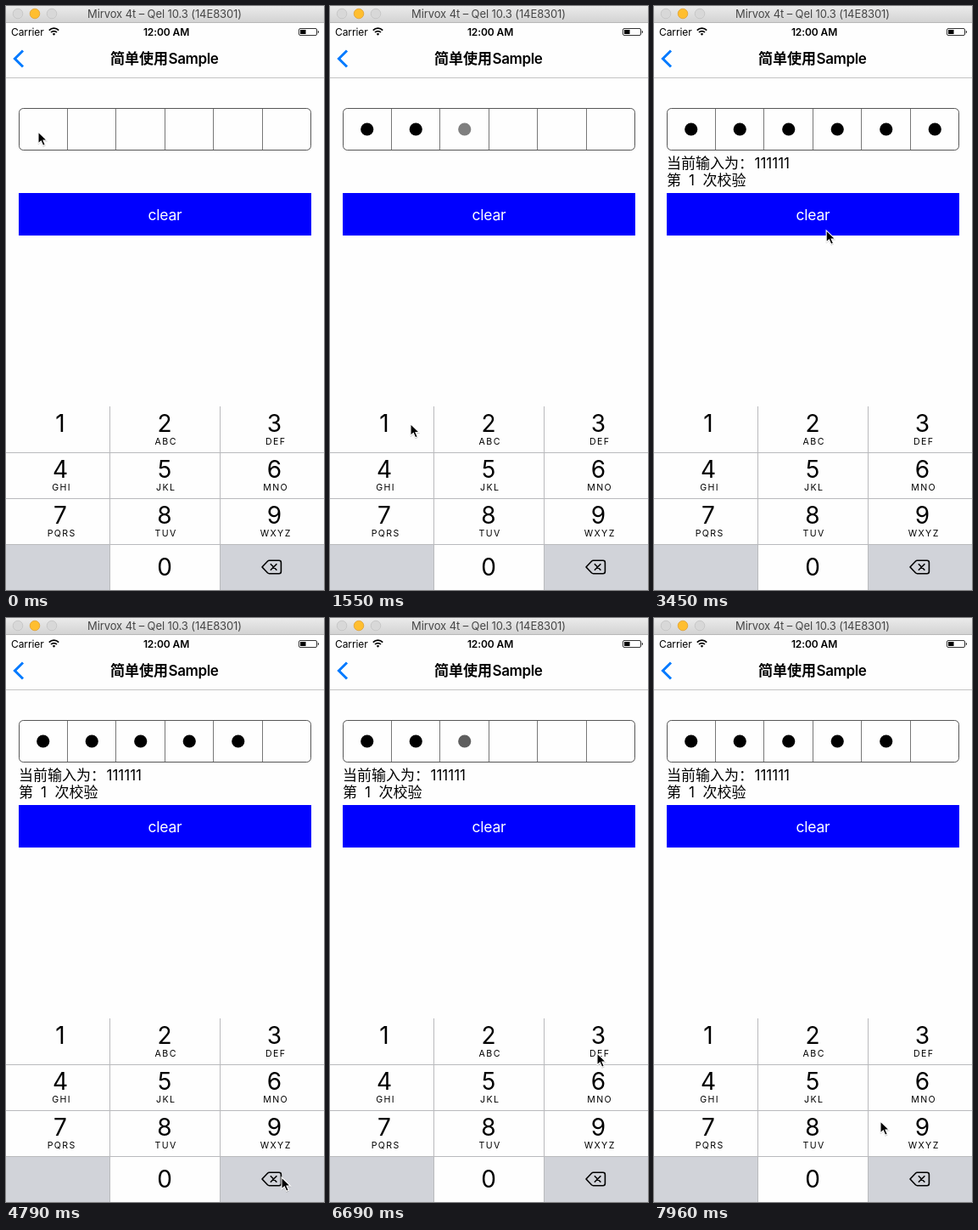
An HTML page for the animation above (8 s loop, 375x687 px).

```html
<!DOCTYPE html>
<html lang="zh-CN">
<head>
<meta charset="utf-8">
<title>Passcode input</title>
<style>
  html, body { margin: 0; width: 100%; height: 100%; overflow: hidden; background: #fefefe; }
  svg { display: block; width: 375px; height: 687px; }
  text { font-family: Inter, "Noto Sans CJK SC", "Noto Sans CJK", sans-serif; white-space: pre; }
  .mid { text-anchor: middle; }
  .window { font-size: 13px; fill: #464646; letter-spacing: -.1px; }
  .status { font-size: 12px; letter-spacing: -.1px; }
  .bold { font-weight: 600; }
  .title { font-size: 17px; font-weight: 600; letter-spacing: -.4px; }
  .han { font-family: "Noto Sans CJK SC", "Noto Sans CJK", sans-serif; font-size: 17px; }
  .body { font-size: 17px; }
  .clear { font-size: 17.5px; fill: #fff; letter-spacing: -.2px; }
  .digit { font-size: 28px; }
  .letters { font-size: 10.6px; letter-spacing: 1.4px; }
  .line { fill: none; stroke: #000; }
</style>
</head>
<body>
<svg viewBox="0 0 375 687">
  <defs>
    <linearGradient id="bar" x2="0" y2="1">
      <stop stop-color="#ebebeb"/><stop offset="1" stop-color="#d3d3d3"/>
    </linearGradient>
  </defs>
  <rect width="375" height="687" fill="#fefefe"/>

  <rect width="375" height="19" fill="url(#bar)"/>
  <rect y="19" width="375" height="1" fill="#b8b8b8"/>
  <g stroke-width=".8">
    <circle cx="14" cy="9" r="5.8" fill="#d8d8d8" stroke="#c3c3c3"/>
    <circle cx="34" cy="9" r="5.8" fill="#ffbe2f" stroke="#e0a032"/>
    <circle cx="54" cy="9" r="5.8" fill="#d8d8d8" stroke="#c3c3c3"/>
  </g>
  <text class="window mid" x="187" y="14">Mirvox 4t – Qel 10.3 (14E8301)</text>

  <text class="status" x="6" y="34.5">Carrier</text>
  <g class="line" stroke-width="1.7">
    <path d="M50.8 28.6a8 8 0 0 1 11.4 0M53 31a4.9 4.9 0 0 1 7 0"/>
    <path d="M56.5 34.8l-1.8-2a2.7 2.7 0 0 1 3.6 0z" fill="#000" stroke="none"/>
  </g>
  <text class="status bold mid" x="189" y="34.5">12:00 AM</text>
  <rect class="line" x="345.5" y="26.5" width="21" height="8" rx="1.5" stroke-width=".8"/>
  <rect x="347" y="28" width="6.5" height="5" fill="#000"/>
  <path d="M367.8 28.8a2 2 0 0 1 0 3.6z"/>

  <path d="M20 52.5L10.4 62L20 71.5" fill="none" stroke="#007aff" stroke-width="3"/>
  <text class="han bold" x="123" y="68">简单使用</text>
  <text class="title" x="191.5" y="68">Sample</text>
  <rect y="84" width="375" height="1" fill="#c4c4c4"/>

  <rect class="line" x="15.5" y="120.5" width="344" height="49" rx="5" stroke="#000" stroke-opacity=".66"/>
  <g id="cells"></g>
  <g id="result">
    <text class="han" x="15" y="191">当前输入为：</text>
    <text class="body" x="118.5" y="191">111111</text>
    <text class="han" x="15" y="211">第</text>
    <text class="body" x="41" y="211">1</text>
    <text class="han" x="57.5" y="211">次校验</text>
  </g>

  <rect x="15" y="220" width="345" height="50" fill="#00f"/>
  <text class="clear mid" x="187.5" y="251.5">clear</text>

  <g id="pad"></g>
  <g id="erase" class="line" stroke-width="1.6" stroke-linejoin="round" stroke-linecap="round">
    <path d="M302 660l6.4-6.8q.9-.9 2.1-.9H322q2.4 0 2.4 2.4v10.6q0 2.4-2.4 2.4h-11.5q-1.2 0-2.1-.9z"/>
    <path id="cross" d="M312.3 656.7l6.6 6.6m0-6.6l-6.6 6.6"/>
  </g>

  <g id="cursor">
    <path d="M0 1V15L3.3 12L5.7 17.3L8.3 16.2L6 11H10.4Z" fill="#000" opacity=".2" stroke="#000"/>
    <path d="M0 0V14L3.3 11L5.7 16.3L8.3 15.2L6 10H10.4Z" fill="#000" stroke="#fff" stroke-width="1.1"/>
  </g>
</svg>
<script>
const LOOP = 8000, GREY = '#d1d3d9', WHITE = '#fefefe', ERASE = 11;
const $ = id => document.getElementById(id);

function add(parent, tag, attrs, text = '') {
  const el = document.createElementNS('http://www.w3.org/2000/svg', tag);
  for (const name in attrs) el.setAttribute(name, attrs[name]);
  el.textContent = text;
  parent.append(el);
  return el;
}

// Input cells
const dots = [];
for (let i = 0; i < 6; i++) {
  const x = 15 + 57.5 * i;
  if (i) add($('cells'), 'rect', { x: Math.floor(x - .1), y: 121, width: 1, height: 48, fill: '#777' });
  dots.push(add($('cells'), 'circle', { cx: x + 28.75, cy: 145, r: 7.6 }));
}

// Number pad
const pad = $('pad'), edges = [0, 123, 253, 375], centers = [64, 187, 316.5];
const letters = ['', 'ABC', 'DEF', 'GHI', 'JKL', 'MNO', 'PQRS', 'TUV', 'WXYZ'];
const restColor = i => i === 9 || i === ERASE ? GREY : WHITE;
const keys = [];
for (let i = 0; i < 12; i++) {
  const col = i % 3, y = 471 + 54 * Math.floor(i / 3), x = centers[col];
  keys.push(add(pad, 'rect', { x: edges[col], y, width: edges[col + 1] - edges[col], height: 54 }));
  if (i < 9) {
    add(pad, 'text', { class: 'digit mid', x, y: y + 30 }, i + 1);
    add(pad, 'text', { class: 'letters mid', x: x + 1.7, y: y + 45 }, letters[i]);
  }
}
add(pad, 'text', { class: 'digit mid', x: 187, y: 670 }, 0);
for (const y of [525, 579, 633]) add(pad, 'rect', { y, width: 375, height: 1, fill: '#b9babd' });
for (const x of [122, 252]) add(pad, 'rect', { x, y: 471, width: 1, height: 216, fill: '#b9babd' });

// Taps: start, end, key, cell, first opacity
const taps = [
  [790, 970, 0, 0], [1150, 1380, 0, 1], [1550, 1780, 0, 2],
  [1950, 2120, 0, 3], [2300, 2470, 0, 4], [2640, 2940, 0, 5],
  [4560, 4790, ERASE, 5], [4900, 5080, ERASE, 4],
  [5250, 5420, ERASE, 3], [5540, 5710, ERASE, 2],
  [6690, 6860, 2, 2, .63], [7130, 7300, 5, 3], [7780, 7960, 8, 4]
];

// Pointer path: time, x, y
const path = [
  [170, 38, 148], [400, 60, 260], [620, 92, 440], [740, 95, 491.5],
  [3200, 95, 491.5], [3310, 140, 390], [3450, 203, 264], [3520, 214, 259.5],
  [3640, 232, 290], [3850, 300, 500], [4020, 325, 599], [4065, 325, 600],
  [4200, 325, 658], [5860, 325, 658], [6000, 322, 630], [6300, 318, 540],
  [6560, 315, 512], [6870, 315, 512], [7080, 305, 550], [7300, 305, 550],
  [7500, 275, 586], [7620, 267, 592]
];

function pointer(t) {
  const next = path.findIndex(p => p[0] > t);
  if (next < 1) return (next ? path[path.length - 1] : path[0]).slice(1);
  const [t0, x0, y0] = path[next - 1], [t1, x1, y1] = path[next];
  const k = (t - t0) / (t1 - t0);
  return [x0 + (x1 - x0) * k, y0 + (y1 - y0) * k];
}

function draw(t) {
  const shown = Array(6).fill(0);
  let lit = -1;
  for (const [start, end, key, cell, first = .5] of taps) {
    if (t < start) break;
    const age = t - start, level = age < 60 ? first : age < 110 ? .9 : 1;
    shown[cell] = key === ERASE ? 1 - level : level;
    if (age >= 60 && t < end) lit = key;
  }
  dots.forEach((dot, i) => dot.setAttribute('opacity', shown[i]));
  keys.forEach((key, i) => {
    const rest = restColor(i);
    key.setAttribute('fill', i !== lit ? rest : rest === GREY ? WHITE : GREY);
  });
  $('erase').setAttribute('fill', lit === ERASE ? '#000' : 'none');
  $('cross').setAttribute('stroke', lit === ERASE ? '#fff' : '#000');
  $('result').setAttribute('visibility', t >= 2640 ? 'visible' : 'hidden');
  $('cursor').setAttribute('transform', `translate(${pointer(t)})`);
}

const began = performance.now();
function tick() {
  draw((performance.now() - began) % LOOP);
  requestAnimationFrame(tick);
}
tick();
</script>
</body>
</html>
```
